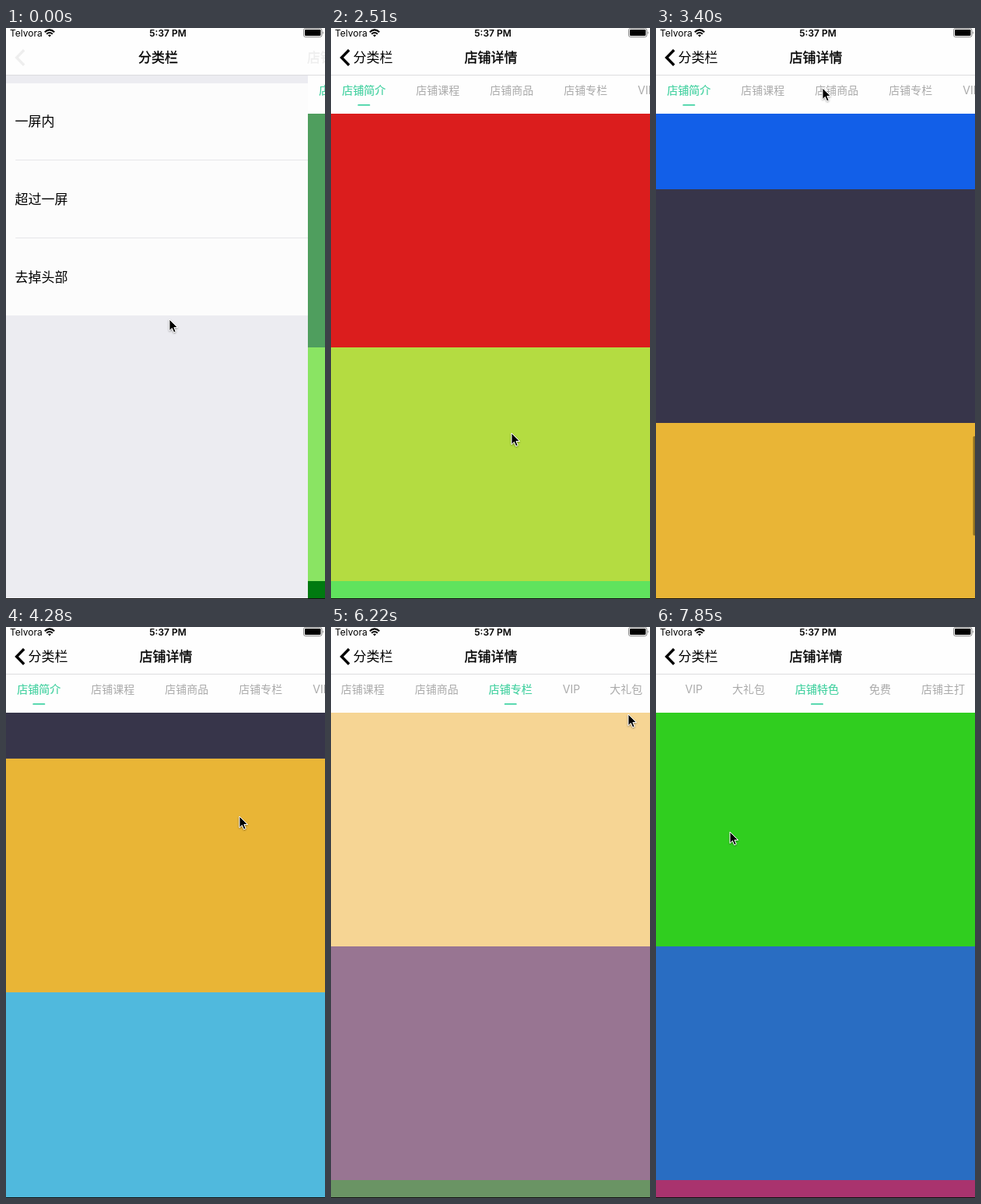
These frames come from a looping animation (410x733 px, 7990 ms). An HTML page:

```html
<!DOCTYPE html>
<html lang="zh-CN">
<head>
<meta charset="utf-8">
<style>
html, body { margin: 0; width: 100%; height: 100%; overflow: hidden; background: #fefefe; }
svg { display: block; width: 410px; height: 733px; }
text { font-family: "Noto Sans CJK SC", "Noto Sans CJK", "Noto Sans CJK JP", sans-serif; white-space: pre; }
.latin { font-family: Inter, Roboto, sans-serif; }
</style>
</head>
<body>
<svg id="stage" viewBox="0 0 410 733" xmlns="http://www.w3.org/2000/svg">
  <defs>
    <linearGradient id="edge">
      <stop offset="0" stop-color="#000" stop-opacity="0"/>
      <stop offset="1" stop-color="#000" stop-opacity=".2"/>
    </linearGradient>
    <filter id="soft" x="-50%" y="-50%" width="200%" height="200%">
      <feDropShadow dx="0" dy="1" stdDeviation="1" flood-opacity=".4"/>
    </filter>
  </defs>
  <rect width="410" height="733" fill="#eeeef3"/>
  <g id="list"><rect y="71" width="440" height="298" fill="#fefefe"/></g>
  <rect id="dim" y="60" width="410" height="673"/>
  <g id="detail">
    <rect id="shadow" x="-9" y="60" width="9" height="673" fill="url(#edge)"/>
    <g id="pages"></g>
    <rect y="60" width="414" height="50" fill="#fefefe"/>
    <g id="tabs"><rect id="mark" y="98" width="16" height="1.8" rx=".9" fill="#43d3a4"/></g>
    <rect id="bar" x="407.5" width="3" height="127.5" rx="1.5" fill-opacity=".38"/>
  </g>
  <rect width="410" height="60" fill="#fefefe"/>
  <rect y="60" width="410" height="1" fill="#dcdcdf"/>
  <path id="back" d="M23.2 28.3 13.6 38 23.2 47.7" fill="none" stroke="#000" stroke-width="3.4"/>
  <g id="nav"></g>
  <text class="latin" x="5" y="11" font-size="12">Telvora</text>
  <text class="latin" x="208" y="11" font-size="12" font-weight="600" text-anchor="middle">5:37 PM</text>
  <path d="M49.8 5.2Q56 -.6 62.2 5.2M52.2 7.8Q56 4.2 59.8 7.8" fill="none" stroke="#000" stroke-width="2.1"/>
  <path d="M54 9.2Q56 7.6 58 9.2L56 11.4Z"/>
  <rect x="382.5" y=".5" width="23.5" height="11" rx="2.4" fill="none" stroke="#888"/>
  <rect x="384" y="2" width="20.5" height="8" rx="1.2"/>
  <path d="M407 4.2Q409 6 407 7.8Z" fill="#888"/>
  <rect y="732" width="410" height="1" fill="#111"/>
  <path id="cursor" d="M0 0V14.6L3.4 11.4 5.7 16.8 8.2 15.7 5.9 10.5H10.6Z"
    stroke="#fff" stroke-linejoin="round" filter="url(#soft)"/>
</svg>
<script>
// Times are in beats: the screen refreshes 54 times per loop.
const LOOP = 7990, BEATS = 54, W = 414, ROW = 300, TOP = 110, DEPTH = 2374;
const PUSH = 13, FLICK = 18.4, SWIPE = 3, CENTRE = 2;
const swipes = [29, 33.5, 38, 42.5, 45.3, 48];

const $ = id => document.getElementById(id);
const set = (el, k, v) => el.setAttribute(k, v);
const move = (el, x, y = 0) => set(el, 'transform', `translate(${x} ${y})`);
const show = (el, on) => set(el, 'visibility', on ? 'visible' : 'hidden');

function add(parent, tag, attrs, label = '') {
  const el = document.createElementNS('http://www.w3.org/2000/svg', tag);
  for (const k in attrs) set(el, k, attrs[k]);
  el.textContent = label;
  return parent.appendChild(el);
}

const span = (b, start, length) => Math.min(1, Math.max(0, (b - start) / length));
const easeOut = (u, power = 2) => 1 - (1 - u) ** power;
const smooth = u => u * u * (3 - 2 * u);
const lerp = (a, c, u) => a + (c - a) * u;

let seed = 7;
const random = () => (seed = seed * 16807 % 2147483647) / 2147483647;
const anyColor = () => `hsl(${random() * 360},${40 + random() * 40}%,${40 + random() * 30}%)`;

// Rows marked ? take a random colour.
const earlier = '#4f9e5e #8ae463 #007a10';
const colors = [
  '? ? ? #0bdd8f #f6d345 #f5a9d0 #125fe8 #37354a #e9b536 ?',
  '#e8dc82 #1759cb #b8bbfb',
  '#734db7 #92bdf6 #a072d5',
  '#f6d594 #987592 #6a9464',
  '? ? ?',
  '? ? ?',
  '#30ce1f #296dc2 #a9336e'
];

function makePage(rows) {
  const g = add($('pages'), 'g', {});
  rows.split(' ').forEach((c, i) => add(g, 'rect', {
    y: TOP + i * ROW, width: W, height: ROW, fill: c === '?' ? anyColor() : c
  }));
  return g;
}
const oldPage = makePage(earlier);
const pages = colors.map(makePage);

['一屏内', '超过一屏', '去掉头部'].forEach((s, i) => {
  add($('list'), 'text', { x: 19.3, y: 126.3 + i * 100, 'font-size': 17 }, s);
  if (i) add($('list'), 'rect', { x: 20, y: 69 + i * 100, width: 420, height: 1, fill: '#e8e8eb' });
});

let left = 14.3;
const tabs = '店铺简介 店铺课程 店铺商品 店铺专栏 VIP 大礼包 店铺特色 免费 店铺主打'.split(' ').map(s => {
  const latin = s === 'VIP', w = latin ? 21.5 : 14 * s.length;
  const el = add($('tabs'), 'text', { x: left, y: 85.3, 'font-size': 14, class: latin ? 'latin' : '' }, s);
  const mid = left + w / 2;
  left += w + 39;
  return { el, mid, offset: Math.max(0, mid - W / 2) };
});

const navText = s => add($('nav'), 'text', { y: 44.4, 'font-size': 17, stroke: '#000', 'stroke-width': .35 }, s);
const listTitle = navText('分类栏'), title = navText('店铺详情');

const gray = [170, 170, 170], green = [67, 209, 160];
const mix = u => `rgb(${gray.map((v, i) => Math.round(lerp(v, green[i], u)))})`;

// Pointer stops: beat, x, y. Every swipe drags from right to left.
const stops = [
  [0, 210, 374], [4, 316, 645], [6, 316, 645], [9, 175, 292], [11, 143, 321], [PUSH, 143, 321],
  [17, 232, 520], [20, 235, 238], [23, 214, 77], [42, 382, 112], [53, 95, 263],
  ...swipes.flatMap(s => [[s, 300, 243], [s + 2, 138, 245]])
].sort((a, c) => a[0] - c[0]);

function pointer(b) {
  const i = Math.max(1, stops.findIndex(s => s[0] >= b));
  const [p, q] = [stops[i - 1], stops[i]];
  const u = smooth(span(b, p[0], q[0] - p[0]));
  return [lerp(p[1], q[1], u), lerp(p[2], q[2], u)];
}

function draw(b) {
  const first = b < PUSH;
  const x = first ? lerp(388, W, easeOut(span(b, 0, 2))) : W * (1 - easeOut(span(b, PUSH, 4), 3));
  const out = x / W;
  const y = DEPTH * (1 - Math.exp(-.4035 * Math.max(0, b - FLICK)));
  const p = swipes.reduce((sum, s) => sum + smooth(span(b, s, SWIPE)), 0);
  // The strip centres the new tab once its page has landed.
  const slide = swipes.reduce((sum, s, i) =>
    sum + (tabs[i + 1].offset - tabs[i].offset) * easeOut(span(b, s + SWIPE, CENTRE)), 0);

  move($('list'), -(W - x) * .3);
  set($('dim'), 'opacity', .1 * (1 - out));
  move($('detail'), x);
  set($('shadow'), 'opacity', first ? 0 : out);

  show(oldPage, first);
  pages.forEach((g, i) => {
    show(g, !first && Math.abs(p - i) < 1);
    move(g, (i - p) * W, i ? 0 : -y);
  });
  set($('bar'), 'y', TOP + 3.8 + y * .2048);
  show($('bar'), b > FLICK && b < swipes[0]);

  move($('tabs'), -slide);
  tabs.forEach(({ el }, i) => {
    const u = Math.max(0, 1 - Math.abs(p - i));
    set(el, 'fill', mix(u));
    set(el, 'stroke', mix(u));
    set(el, 'stroke-width', .2 * u);
  });
  const i = Math.floor(p);
  set($('mark'), 'x', lerp(tabs[i].mid, tabs[i + 1].mid, p - i) - 8);

  set($('back'), 'opacity', 1 - out);
  set(listTitle, 'x', 28.6 + out * 151);
  set(listTitle, 'stroke-width', .35 * out);
  set(title, 'x', 171.5 + out * 230);
  set(title, 'opacity', 1 - out);

  move($('cursor'), ...pointer(b));
}

function tick(now) {
  const t = now % LOOP;
  draw(Math.min(BEATS - 1, Math.floor((t + 12) * BEATS / LOOP)));
  requestAnimationFrame(tick);
}
draw(0);
requestAnimationFrame(tick);
</script>
</body>
</html>
```
